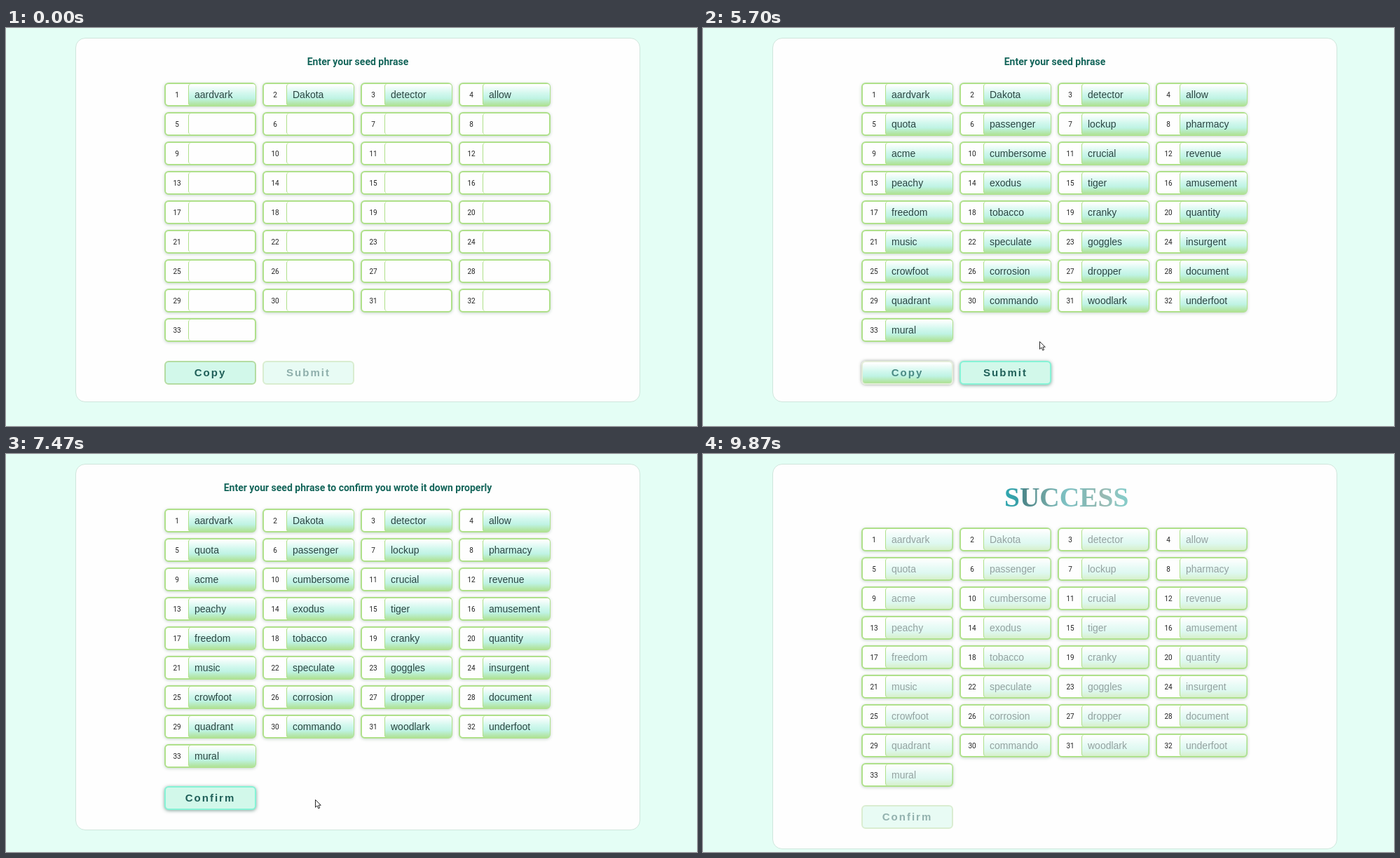
An HTML page for the animation above (9940 ms loop, 986 by 568 pixels).

```html
<!DOCTYPE html>
<html lang="en">
<head>
<meta charset="utf-8">
<title>Seed phrase</title>
<style>
  :root {
    --hold: 9.94s step-end infinite;
    --flow: 9.94s linear infinite;
    --lime: #afe08a;
    --fade: linear-gradient(#fff 3%, #d3f8ee 42%, #bff3e4 66%, #b0e39b 96%);
  }
  * { box-sizing: border-box; }
  html, body { margin: 0; width: 100%; height: 100%; overflow: hidden; }
  body { position: relative; background: #e4fef5; }
  body *, .cursor svg { position: absolute; }
  svg { left: 0; top: 0; overflow: visible; }

  .card {
    left: 99px; top: 14px; width: 806px; height: 520px;
    background: #fefefe; border: 1px solid #cfe6dc; border-radius: 14px;
    animation: card var(--hold);
  }
  h1 {
    left: 99px; top: 38px; width: 806px; margin: 0;
    font: bold 14px/20px Roboto, sans-serif; text-align: center; color: #14655a;
  }
  .success {
    left: 430px; top: 42px; padding-right: 2px; opacity: 0;
    font: bold 39.4px/40px "Liberation Serif", serif; color: transparent;
    background: linear-gradient(90deg, #2fa7b0, #3a9fa7 6%, #4f878a 8%, #6fa5a3 17%, #7fc2c4 25%,
      #86b8b4 34%, #98b9b2 40%, #88ccc9 48%, #6fb5b3 65%, #4f8f92 80%, #2fa7b0) 0 0 / 354px 100%;
    -webkit-background-clip: text; background-clip: text;
    animation: done var(--hold), shimmer var(--flow);
  }

  .lower { left: 0; top: 0; animation: lower var(--hold); }
  .cell {
    width: 131px; height: 34px; background: #fefefe;
    border: 2px solid var(--lime); border-radius: 6px;
    box-shadow: 0 1px 4px rgba(30, 90, 60, .25);
  }
  .num {
    left: 0; top: 0; width: 32px;
    font: 10px/31px Roboto, sans-serif; text-align: center; color: #222;
  }
  .input {
    left: 32px; top: 0; width: 95px; height: 30px;
    border-left: 1px solid var(--lime); border-radius: 4px;
  }
  .word {
    left: -1px; top: 0; width: 96px; height: 31px; padding-left: 8px; opacity: 0;
    font: 14px/30px "Liberation Sans", Arial, sans-serif; color: #2b4542;
    background: var(--fade); border-left: 1px solid var(--lime); border-radius: 4px;
    animation: pasted var(--hold);
  }
  .known { animation-name: known; }
  .focus {
    left: 32px; top: -2px; width: 97px; height: 34px; opacity: 0;
    border: 2px solid #8cc57a; border-radius: 5px; box-shadow: 0 1px 4px rgba(0, 40, 10, .5);
  }
  .caret { left: 40px; top: 7px; width: 2px; height: 16px; background: #111; opacity: 0; }
  .first .focus { animation: focus1 var(--hold); }
  .first .caret { animation: caret1 var(--hold); }
  .fifth .focus { animation: focus5 var(--hold); }
  .fifth .caret { animation: caret5 var(--hold); }

  .btn {
    top: 475px; width: 131px; height: 34px; text-align: center;
    font: bold 15px/30px "Liberation Sans", Arial, sans-serif; letter-spacing: 2px;
    color: #1f5f58; background: #d2f8ea; border: 2px solid #b4dca2; border-radius: 6px;
  }
  .copy { left: 226px; animation: copy var(--hold); }
  .submit { left: 366px; animation: submit var(--hold); }
  .confirm { left: 226px; top: 474px; animation: confirm var(--hold); }
  .enter { animation: enter var(--hold); }
  .verify { animation: verify var(--hold); }

  .cursor { left: 0; top: 0; width: 0; height: 0; animation: move var(--flow); }
  .cursor path { fill: #fff; stroke: #111; stroke-width: .9; stroke-linejoin: round; }
  .arrow { animation: arrow var(--hold); }
  .beam { animation: beam var(--hold); }
  .cursor .beam path { fill: none; stroke: #222; }
  .hand { animation: hand var(--hold); }

  /* 1% of the loop is 99.4 ms */
  @keyframes card { 64.98% { height: 523px; } 85.61% { height: 550px; } }
  @keyframes lower { 85.61% { transform: translateY(27px); } }
  @keyframes enter { 0% { opacity: 1; } 64.98% { opacity: 0; } }
  @keyframes verify { 0%, 85.61% { opacity: 0; } 64.98% { opacity: 1; } }
  @keyframes done { 0% { opacity: 0; } 85.61% { opacity: 1; } }
  @keyframes shimmer { 0%, 85.61% { background-position: 100px 0; } 100% { background-position: -5px 0; } }

  @keyframes known { 0%, 75.15% { opacity: 1; } 64.98% { opacity: 0; } 85.61% { opacity: .5; } }
  @keyframes pasted { 0%, 64.98% { opacity: 0; } 25.55%, 75.15% { opacity: 1; } 85.61% { opacity: .5; } }
  @keyframes focus5 { 0%, 25.55% { opacity: 0; } 15.49% { opacity: .7; } 16.8% { opacity: 1; } }
  @keyframes caret5 { 0%, 18.81%, 25.55% { opacity: 0; } 16.8%, 24.14% { opacity: 1; } }
  @keyframes focus1 { 0%, 75.15% { opacity: 0; } 64.98% { opacity: .6; } 67.1% { opacity: 1; } }
  @keyframes caret1 { 0%, 72.43% { opacity: 0; } 67.1% { opacity: 1; } }

  @keyframes copy {
    25.55% { border-color: #86f3d6; box-shadow: 0 1px 5px rgba(0, 70, 50, .5); }
    50.4% { color: #337a72; background: #d0f7ea; border-color: #effdf8; box-shadow: 0 1px 5px rgba(0, 50, 35, .6); }
    54.72% { opacity: 1; color: #4b8a84; background: var(--fade); border-color: #e3ecd9; box-shadow: 0 0 4px rgba(50, 70, 50, .5); }
    64.98% { opacity: 0; }
  }
  @keyframes submit {
    0% { opacity: .5; }
    25.55% { opacity: 1; border-color: #b4dca2; box-shadow: none; }
    54.72% { opacity: 1; color: #1f5f58; border-color: #86f3d6; box-shadow: 0 1px 5px rgba(0, 70, 50, .5); }
    60.36% { opacity: 1; color: #337a72; border-color: #effdf8; box-shadow: 0 1px 5px rgba(0, 50, 35, .6); }
    64.98% { opacity: 0; }
  }
  @keyframes confirm {
    0% { opacity: 0; }
    64.98% { opacity: .48; border-color: #b4dca2; box-shadow: none; }
    75.15% { opacity: 1; color: #1f5f58; border-color: #86f3d6; box-shadow: 0 1px 5px rgba(0, 70, 50, .5); }
    81.7% { opacity: 1; color: #337a72; border-color: #effdf8; box-shadow: 0 1px 5px rgba(0, 50, 35, .6); }
    85.61% { opacity: .48; color: #1f5f58; border-color: #b4dca2; box-shadow: none; }
  }

  @keyframes move {
    0%, 5.92% { transform: translate(1000px, 450px); }
    5.93% { transform: translate(897px, 382px); }
    7.34% { transform: translate(790px, 285px); }
    8.75% { transform: translate(660px, 190px); }
    10.16% { transform: translate(545px, 120px); }
    11.57% { transform: translate(430px, 82px); }
    12.98% { transform: translate(350px, 95px); }
    14.29% { transform: translate(312px, 121px); }
    15.49%, 42.94% { transform: translate(301px, 131px); }
    42.95% { transform: translate(327px, 168px); }
    44.27% { transform: translate(360px, 225px); }
    45.67% { transform: translate(384px, 285px); }
    47.08% { transform: translate(394px, 345px); }
    48.49% { transform: translate(380px, 410px); }
    49.9% { transform: translate(355px, 462px); }
    52.01%, 54.72% { transform: translate(338px, 490px); }
    55.33% { transform: translate(375px, 478px); }
    56.34% { transform: translate(440px, 458px); }
    57.34% { transform: translate(480px, 447px); }
    58.85% { transform: translate(478px, 456px); }
    60.36% { transform: translate(462px, 476px); }
    62.37% { transform: translate(447px, 490px); }
    64.28%, 77.26% { transform: translate(441px, 493px); }
    79.48% { transform: translate(410px, 488px); }
    81.99% { transform: translate(350px, 489px); }
    84% { transform: translate(320px, 497px); }
    84.9%, 87.62% { transform: translate(314px, 499px); }
    89.03% { transform: translate(380px, 508px); }
    90.54% { transform: translate(500px, 512px); }
    92.05% { transform: translate(620px, 508px); }
    93.25% { transform: translate(715px, 495px); }
    94.36% { transform: translate(800px, 487px); }
    95.57% { transform: translate(900px, 505px); }
    96.58% { transform: translate(945px, 545px); }
    97.18%, 100% { transform: translate(952px, 580px); }
  }
  @keyframes arrow {
    0%, 8.55%, 10.2%, 11.9%, 44.1%, 55.03%, 64.98%, 85.61% { opacity: 1; }
    7.55%, 9%, 10.75%, 12.88%, 50.4%, 60.36%, 81.7% { opacity: 0; }
  }
  @keyframes beam {
    0%, 8.55%, 10.2%, 11.9%, 44.1% { opacity: 0; }
    7.55%, 9%, 10.75%, 12.88% { opacity: 1; }
  }
  @keyframes hand {
    0%, 55.03%, 64.98%, 85.61% { opacity: 0; }
    50.4%, 60.36%, 81.7% { opacity: 1; }
  }
</style>
</head>
<body>
  <div class="card"></div>
  <h1 class="enter">Enter your seed phrase</h1>
  <h1 class="verify">Enter your seed phrase to confirm you wrote it down properly</h1>
  <div class="success">SUCCESS</div>
  <div class="lower">
    <div id="grid"></div>
    <div class="btn confirm">Confirm</div>
  </div>
  <div class="btn copy">Copy</div>
  <div class="btn submit">Submit</div>
  <div class="cursor">
    <svg class="arrow" width="10" height="14"><path d="M.5.5V11.2L3 8.9 4.8 12.9 6.6 12.1 4.9 8.2H8.3Z"/></svg>
    <svg class="beam" width="8" height="12"><path d="M-3-5.5H-1Q0-5.5 0-4.5Q0-5.5 1-5.5H3M0-5V5M-3 5.5H-1Q0 5.5 0 4.5Q0 5.5 1 5.5H3"/></svg>
    <svg class="hand" width="12" height="17"><path d="M-1.2 10V1.6Q-1.2.4 0 .4T1.2 1.6V6.2Q1.4 5.3 2.4 5.5T3.5 6.7Q3.8 5.9 4.7 6.2T5.6 7.5Q6 6.8 6.7 7.2T7.3 8.5V11.5Q7.2 13.3 6 14.6V16.6H-.6V15Q-2.6 13-4.6 9.7Q-5.1 8.6-4.2 8.2T-2.4 8.8ZM1.2 6.2V9M3.5 6.7V9.2M5.6 7.5V9.4"/></svg>
  </div>
<script>
  const words = `aardvark Dakota detector allow quota passenger lockup pharmacy acme cumbersome
    crucial revenue peachy exodus tiger amusement freedom tobacco cranky quantity music speculate
    goggles insurgent crowfoot corrosion dropper document quadrant commando woodlark underfoot
    mural`.split(/\s+/);
  const focusable = { 0: 'first', 4: 'fifth' };

  document.getElementById('grid').innerHTML = words.map((word, i) => {
    const left = 226 + i % 4 * 140, top = 78 + Math.floor(i / 4) * 42;
    const marks = i in focusable ? '<div class="focus"></div><div class="caret"></div>' : '';
    return `<div class="cell ${focusable[i] || ''}" style="left:${left}px;top:${top}px">
      <div class="num">${i + 1}</div>
      <div class="input"><div class="word ${i < 4 ? 'known' : ''}">${word}</div></div>${marks}
    </div>`;
  }).join('');
</script>
</body>
</html>
```
